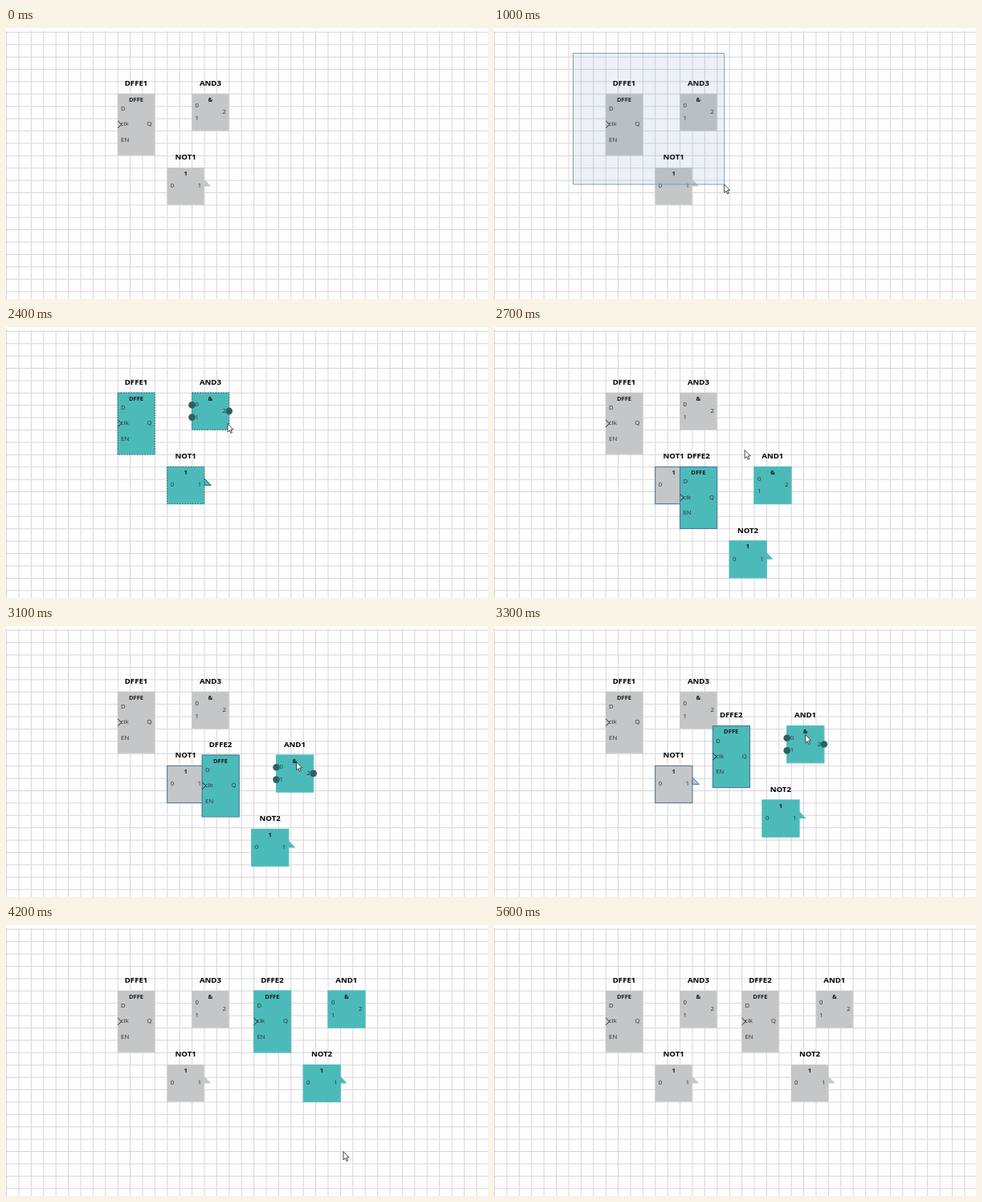
An HTML page with a canvas that plays this animation: 600x338 px, repeating every 7.1 s.

```html
<!DOCTYPE html>
<html>
<head>
<meta charset="utf-8">
<style>
html, body { margin: 0; width: 600px; height: 338px; overflow: hidden; background: #fefefe; }
canvas { display: block; }
</style>
</head>
<body>
<canvas id="stage" width="600" height="338"></canvas>
<script>
const ctx = document.getElementById('stage').getContext('2d');
const LOOP = 7100, CELL = 15.4, SIDE = 3 * CELL;
const ORIGIN = { x: 138.9, y: 81.8 };
const GRAY = '#c5c6c7', TEAL = '#4dbaba', PIN = '#2f5f63', BLUE = '#44729b', DARK = '#24686c';

// Columns, rows and heights count grid cells.
const blocks = [
  { kind: 'DFFE', symbol: 'DFFE', names: ['DFFE1', 'DFFE2'], col: 0, row: 0, rows: 5,
    inputs: ['D', 'clk', 'EN'], output: 'Q' },
  { kind: 'NOT', symbol: '1', names: ['NOT1', 'NOT2'], col: 4, row: 6, rows: 3,
    inputs: ['0'], output: '1' },
  { kind: 'AND', symbol: '&', names: ['AND3', 'AND1'], col: 6, row: 0, rows: 3,
    inputs: ['0', '1'], output: '2' }
];

// The pointer moves straight from stop to stop.
const stops = [
  { t: 400, x: 98, y: 31 }, { t: 1200, x: 349, y: 249 }, { t: 1600, x: 349, y: 249 },
  { t: 2400, x: 275.5, y: 120 }, { t: 3000, x: 348, y: 186 }, { t: 3500, x: 413.5, y: 101 },
  { t: 3800, x: 421, y: 92 }, { t: 4200, x: 419.5, y: 282 },
  { t: 5200, x: 419.5, y: 282 }, { t: 5400, x: 422, y: 295 }
];

const clamp = (v, lo, hi) => Math.min(hi, Math.max(lo, v));

function pointerAt(t) {
  const i = clamp(stops.findLastIndex(s => s.t <= t), 0, stops.length - 2);
  const a = stops[i], b = stops[i + 1], p = clamp((t - a.t) / (b.t - a.t), 0, 1);
  return { x: a.x + (b.x - a.x) * p, y: a.y + (b.y - a.y) * p };
}

// Copies appear six cells away, then are dragged steadily to their slot.
function copyOffset(t) {
  const drag = (t - 3100) / 100;
  return {
    x: clamp(105 + 14.1 * drag, 6 * CELL, 11 * CELL),
    y: clamp(79 - 18.2 * drag, 0, 6 * CELL)
  };
}

function path(points, closed) {
  ctx.beginPath();
  points.forEach(([x, y]) => ctx.lineTo(x, y));
  if (closed) ctx.closePath();
}

function text(str, x, y, size, bold, align) {
  ctx.font = `${bold ? 'bold ' : ''}${size}px "Open Sans", "Noto Sans", sans-serif`;
  ctx.textAlign = align;
  ctx.fillText(str, x, y);
}

function drawGrid() {
  ctx.fillStyle = '#fefefe';
  ctx.fillRect(0, 0, 600, 338);
  ctx.fillStyle = '#d9d5db';
  for (let x = ORIGIN.x - 9 * CELL - 0.2; x < 600; x += CELL) ctx.fillRect(x, 4, 1, 334);
  for (let y = ORIGIN.y - 5 * CELL; y < 338; y += CELL) ctx.fillRect(0, y, 600, 1);
}

function drawBlock(block, copy, offset, pointer, { fill, edge, dashed, hoverable }) {
  const { kind, inputs } = block;
  const x0 = ORIGIN.x + block.col * CELL + offset.x;
  const y0 = ORIGIN.y + block.row * CELL + offset.y;
  const h = block.rows * CELL;
  const inputY = inputs.map((_, i) => h * (i + 1) / (inputs.length + 1));

  ctx.save();
  ctx.translate(x0, y0);
  ctx.fillStyle = fill;
  ctx.strokeStyle = edge || fill;
  ctx.lineWidth = 1;
  if (kind === 'NOT') {
    path([[SIDE, 14.3], [SIDE + 8.5, 23.2], [SIDE, 23.2]], true);
    ctx.fill();
    if (edge) ctx.stroke();
  }
  ctx.fillRect(0, 0, SIDE, h);
  if (edge || fill === TEAL) {
    if (dashed) ctx.setLineDash([2, 1.2]);
    ctx.strokeRect(0.2, 0.2, SIDE, h);
    ctx.setLineDash([]);
  }

  const inside = Math.abs(pointer.x - x0 - SIDE / 2) < SIDE / 2 + 4
    && Math.abs(pointer.y - y0 - h / 2) < h / 2;
  if (hoverable && kind === 'AND' && inside) {
    ctx.fillStyle = PIN;
    for (const [x, y] of [...inputY.map(y => [0, y]), [SIDE, h / 2]]) {
      ctx.beginPath();
      ctx.arc(x + 0.2, y, 4.3, 0, 7);
      ctx.fill();
    }
  }

  ctx.fillStyle = '#000';
  text(block.names[copy], SIDE / 2, -10, 9.6, true, 'center');
  ctx.fillStyle = '#181818';
  text(block.symbol, SIDE / 2, 9.8, 7.6, true, 'center');
  ctx.fillStyle = '#2c2c2c';
  inputs.forEach((label, i) => text(label, 4.2, inputY[i] + 2, 7.7, false, 'left'));
  text(block.output, SIDE - 3.5, h / 2 + 2, 7.7, false, 'right');
  if (kind === 'DFFE') {
    ctx.strokeStyle = '#222';
    path([[0.3, h / 2 - 4.3], [5, h / 2], [0.3, h / 2 + 4.3]]);
    ctx.stroke();
  }
  ctx.restore();
}

function drawPointer({ x, y }) {
  ctx.save();
  ctx.translate(x + 0.4, y + 0.5);
  path([[0, 0], [0, 10.3], [2.4, 8.2], [4, 11.9], [5.6, 11.2], [4, 7.6], [7, 7.3]], true);
  ctx.fillStyle = '#fff';
  ctx.strokeStyle = '#333';
  ctx.lineWidth = 0.9;
  ctx.fill();
  ctx.stroke();
  ctx.restore();
}

function drawMarquee({ x, y }) {
  const { x: left, y: top } = stops[0];
  ctx.fillStyle = 'rgba(70, 130, 180, 0.1)';
  ctx.strokeStyle = '#7f9fb8';
  ctx.lineWidth = 1;
  ctx.beginPath();
  ctx.rect(left + 0.5, top + 0.5, x - left, y - top);
  ctx.fill();
  ctx.stroke();
}

function draw(t) {
  const pointer = pointerAt(t);
  const selected = t >= 1500, pasted = t >= 2600, overlap = pasted && t < 3700;
  const dashed = t >= 2300 && !pasted;

  drawGrid();
  for (const b of blocks) {
    drawBlock(b, 0, { x: 0, y: 0 }, pointer, {
      fill: selected && !pasted ? TEAL : GRAY,
      edge: dashed ? DARK : overlap && b.kind === 'NOT' ? BLUE : null,
      dashed,
      hoverable: selected
    });
  }
  if (pasted) for (const b of blocks) {
    drawBlock(b, 1, copyOffset(t), pointer, {
      fill: t < 5400 ? TEAL : GRAY,
      edge: overlap && b.kind === 'DFFE' ? (t < 3400 ? BLUE : DARK) : null,
      hoverable: true
    });
  }
  if (t >= 400 && !selected) drawMarquee(pointer);
  if (t >= 400 && t < 5600) drawPointer(pointer);
}

const start = performance.now();
function tick() {
  const t = (performance.now() - start) % LOOP;
  draw(Math.floor(t / 100) * 100); // the picture advances in tenths of a second
  requestAnimationFrame(tick);
}
tick();
</script>
</body>
</html>
```
